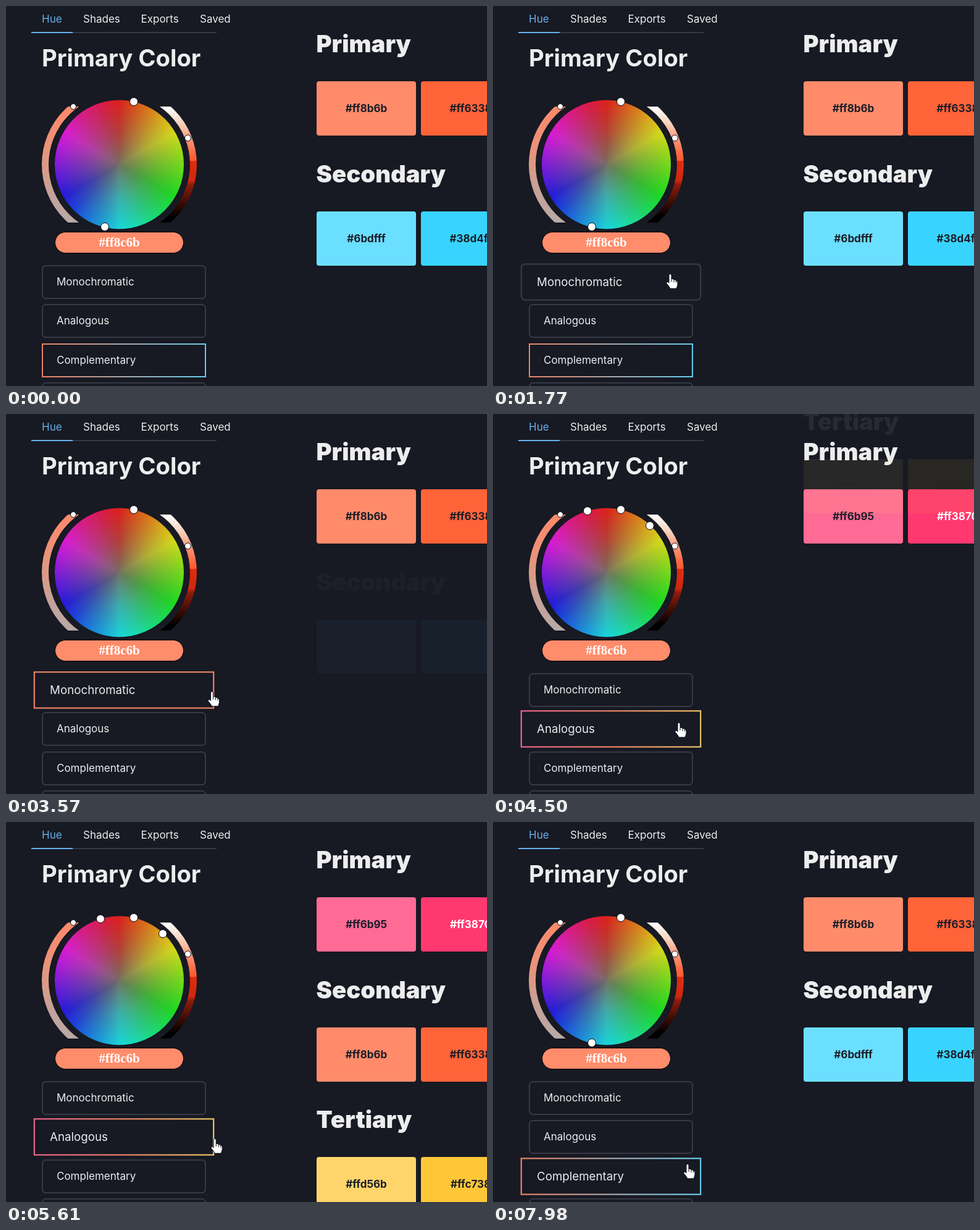
Animation of 779 by 616 pixels, one loop 8 s. Source, as an HTML page with a canvas:

```html
<!DOCTYPE html>
<html lang="en">
<head>
<meta charset="utf-8">
<title>Color palette picker</title>
<style>
  html, body { margin: 0; width: 100%; height: 100%; overflow: hidden; background: #171923; }
  canvas { display: block; }
</style>
</head>
<body>
<canvas id="stage" width="779" height="616"></canvas>
<script>
const ctx = document.getElementById('stage').getContext('2d');
const LOOP = 8000;
const BG = '#171923', LIGHT = '#ededee', DARK = '#1a1d28', LINE = '#373a44', BLUE = '#63b3ed';
const SANS = 'Inter, sans-serif';
const WHEEL = { x: 183.5, y: 257, r: 104.5 };

const CORAL = ['#ff8b6b', '#ff6338'];
const CYAN = ['#6bdfff', '#38d4ff'];
const PINK = ['#ff6b95', '#ff3870'];
const YELLOW = ['#ffd56b', '#ffc738'];
const MAIN_DOT = [207, 155];
const SCHEMES = {
  Monochromatic: { rows: [CORAL], dots: [MAIN_DOT] },
  Analogous: { rows: [PINK, CORAL, YELLOW], dots: [[153, 157], MAIN_DOT, [254, 181]] },
  Complementary: { rows: [CORAL, CYAN], dots: [MAIN_DOT, [160, 358]] }
};
const CLICK = { mono: 2050, analogous: 4470, complementary: 6890 };
const ENTER = 4483;

const BUTTONS = [
  { label: 'Monochromatic', y: 420, enter: 1330, leave: 3640 },
  { label: 'Analogous', y: 483, enter: 3760, leave: 5620 },
  { label: 'Complementary', y: 547, enter: 6326, leave: Infinity },
  { label: '', y: 610, enter: Infinity, leave: Infinity }
];

// time, x, y of the pointer tip
const POINTER = [
  [380, 529, 618], [620, 502, 548], [900, 446, 487], [1180, 364, 444],
  [1340, 320, 445], [1500, 297, 457], [1740, 287, 434], [3140, 287, 434],
  [3640, 339, 455], [3760, 322, 484], [3940, 293, 486], [4270, 293, 486],
  [4300, 291, 489], [4420, 291, 489], [4500, 301, 500], [4860, 299, 503],
  [5410, 299, 503], [5620, 340, 514], [5900, 391, 553], [6150, 364, 591],
  [6326, 324, 580], [6420, 319, 570], [7910, 319, 570], [7980, 315, 554], [8000, 315, 554]
];

const clamp = v => Math.min(1, Math.max(0, v));

function spring(ms) {
  if (!(ms > 0)) return 0;
  const s = ms / 1000, decay = 15, freq = 18;
  return 1 - Math.exp(-decay * s) * (Math.cos(freq * s) + decay / freq * Math.sin(freq * s));
}

function pointerAt(t) {
  const i = POINTER.findIndex((p, k) => k > 0 && t <= p[0]);
  if (t < POINTER[0][0] || i < 0) return null;
  const a = POINTER[i - 1], b = POINTER[i], span = b[0] - a[0], u = (t - a[0]) / span;
  const rests = (p, q) => !p || !q || (p[1] === q[1] && p[2] === q[2]);
  const slope = (k, axis) => {
    const prev = POINTER[k - 1], here = POINTER[k], next = POINTER[k + 1];
    if (rests(prev, here) || rests(here, next)) return 0;
    return (next[axis] - prev[axis]) / (next[0] - prev[0]);
  };
  const at = axis => {
    const w = u * u * (3 - 2 * u);
    return a[axis] + (b[axis] - a[axis]) * w +
      span * (slope(i - 1, axis) * u * (1 - u) ** 2 - slope(i, axis) * u * u * (1 - u));
  };
  return [at(1), at(2)];
}

function text(str, x, y, font, color, align = 'left') {
  ctx.font = font;
  ctx.fillStyle = color;
  ctx.textAlign = align;
  ctx.fillText(str, x, y);
}

function rounded(x, y, w, h, r) {
  ctx.beginPath();
  ctx.roundRect(x, y, w, h, r);
}

function linear(x0, y0, x1, y1, stops) {
  const g = ctx.createLinearGradient(x0, y0, x1, y1);
  stops.forEach(([at, color]) => g.addColorStop(at, color));
  return g;
}

function dot(x, y, r) {
  ctx.beginPath();
  ctx.arc(x, y, r, 0, Math.PI * 2);
  ctx.fillStyle = '#fff';
  ctx.fill();
  ctx.lineWidth = 1;
  ctx.strokeStyle = '#000';
  ctx.stroke();
}

function drawTabs() {
  ctx.fillStyle = LINE;
  ctx.fillRect(41, 42, 300, 2);
  ctx.fillStyle = BLUE;
  ctx.fillRect(41, 42, 67, 2);
  [['Hue', 58], ['Shades', 125], ['Exports', 218.5], ['Saved', 314]].forEach(([name, x], i) =>
    text(name, x, 27, `17px ${SANS}`, i ? LIGHT : BLUE));
}

function drawSliders() {
  const { x, y } = WHEEL, mid = 120, width = 11;
  const left = linear(0, 163, 0, 351, [[0, '#ff8a69'], [0.25, '#f08f74'], [0.5, '#dc9a84'], [0.75, '#c4a299'], [1, '#b8aaa6']]);
  const right = linear(0, 163, 0, 351, [
    [0, '#fff'], [0.13, '#f3d9c4'], [0.27, '#ff9c7f'], [0.4, '#ff6a40'], [0.47, '#ff5a2c'],
    [0.47, '#dd2c10'], [0.64, '#d2260d'], [0.67, '#8e1c0c'], [0.83, '#3c0c06'], [0.95, '#000'], [1, '#000']
  ]);
  ctx.save();
  ctx.beginPath();
  ctx.rect(50, 163, 270, 188);
  ctx.clip();
  ctx.lineWidth = width;
  [[left, Math.PI / 2], [right, -Math.PI / 2]].forEach(([paint, from]) => {
    ctx.beginPath();
    ctx.arc(x, y, mid, from, from + Math.PI);
    ctx.strokeStyle = paint;
    ctx.stroke();
  });
  ctx.restore();
  dot(109, 163, 4.5);
  dot(294.5, 214, 5);
}

function drawWheel() {
  const { x, y, r } = WHEEL;
  const hues = ctx.createConicGradient(-Math.PI / 2, x, y);
  for (let h = 0; h <= 360; h += 15) hues.addColorStop(h / 360, `hsl(${h + 2}, 79%, 48%)`);
  const grey = ctx.createRadialGradient(x, y, 0, x, y, r);
  grey.addColorStop(0, 'rgba(116,112,98,0.95)');
  grey.addColorStop(0.5, 'rgba(116,112,98,0.4)');
  grey.addColorStop(1, 'rgba(116,112,98,0)');
  ctx.beginPath();
  ctx.arc(x, y, r, 0, Math.PI * 2);
  for (const paint of [hues, grey]) {
    ctx.fillStyle = paint;
    ctx.fill();
  }
}

function drawPill() {
  rounded(79.5, 366.5, 208, 34, 17);
  ctx.fillStyle = '#ff8c6b';
  ctx.fill();
  ctx.lineWidth = 1;
  ctx.strokeStyle = '#000';
  ctx.stroke();
  text('#ff8c6b', 183.5, 390, 'bold 21px "Liberation Serif", serif', '#fff', 'center');
}

function drawButton(button, t, active) {
  const { label, y, enter, leave } = button;
  const scale = 1 + 0.1 * (spring(t - enter) - spring(t - leave));
  const cx = 191, cy = y + 27.5;
  ctx.save();
  ctx.translate(cx, cy);
  ctx.scale(scale, scale);
  ctx.translate(-cx, -cy);
  ctx.lineWidth = 2;
  if (active) {
    const rows = SCHEMES[label].rows, last = Math.max(1, rows.length - 1);
    ctx.globalAlpha = 0.92;
    ctx.strokeStyle = linear(58, 0, 324, 0, rows.map((row, i) => [i / last, row[0]]));
    ctx.strokeRect(59, y + 1, 264, 53);
    ctx.globalAlpha = 1;
  } else {
    ctx.strokeStyle = LINE;
    rounded(59, y + 1, 264, 53, 5.5);
    ctx.stroke();
  }
  text(label, 82, y + 33, `17px ${SANS}`, LIGHT);
  ctx.restore();
}

function drawRow(index, colors, alpha, offset) {
  if (alpha <= 0) return;
  const title = ['Primary', 'Secondary', 'Tertiary'][index];
  const top = Math.round(122 + index * 210.6 + offset);
  ctx.globalAlpha = alpha;
  text(title, 502.5, top - 47, `900 38.25px ${SANS}`, LIGHT);
  colors.forEach((color, i) => {
    const x = 503 + i * 169;
    rounded(x, top, 161, 88, 4);
    ctx.fillStyle = color;
    ctx.fill();
    text(color, x + 80.5, top + 50, `bold 17px ${SANS}`, color === PINK[1] ? '#fff' : DARK, 'center');
  });
  ctx.globalAlpha = 1;
}

function drawPalette(t, scheme) {
  const fade = since => (1 - clamp((t - since) / 500)) ** 4;
  const age = Math.max(0, t - ENTER), damp = 0.022 * age;
  const entering = t >= CLICK.analogous && t < CLICK.complementary;
  const alpha = entering ? 1 - (1 - clamp(age / 500)) ** 2.2 : 1;
  const offset = entering ? -500 * (1 + damp) * Math.exp(-damp) : 0;

  scheme.rows.forEach((colors, i) => drawRow(i, colors, i ? alpha : 1, i ? offset : 0));
  if (t >= CLICK.mono && t < CLICK.analogous) drawRow(1, CYAN, Math.max(0.035, fade(CLICK.mono)), 0);
  if (t >= CLICK.complementary) drawRow(2, YELLOW, fade(CLICK.complementary), 0);
}

const HAND = new Path2D('M-2 2Q0-1.5 2 2V8.5Q5 7.5 6 10Q9 9 9.5 11.5Q12 11 12 13.5V18Q11.5 21 10 24H0Q-2 20-6 15.5Q-6.5 12.5-4 13L-2 15Z');
const FINGERS = new Path2D('M2 9V13M6 10.5V14M9.5 12V14.5');
const ARROW = new Path2D('M0 0V16L4 12.5L6.5 18.5L9 17.3L6.5 11.5H12Z');

function drawPointer(t) {
  const tip = pointerAt(t);
  if (!tip) return;
  const hand = BUTTONS.some(b => t >= b.enter && t < b.leave);
  const shape = hand ? HAND : ARROW;
  ctx.save();
  ctx.translate(...tip);
  ctx.lineWidth = 1;
  ctx.strokeStyle = '#0b0c12';
  ctx.fillStyle = '#fff';
  ctx.fill(shape);
  ctx.stroke(shape);
  if (hand) ctx.stroke(FINGERS);
  ctx.restore();
}

function schemeAt(t) {
  if (t < CLICK.mono || t >= CLICK.complementary) return 'Complementary';
  return t < CLICK.analogous ? 'Monochromatic' : 'Analogous';
}

function draw(t) {
  const name = schemeAt(t), scheme = SCHEMES[name];
  ctx.fillStyle = BG;
  ctx.fillRect(0, 0, 779, 616);
  drawTabs();
  text('Primary Color', 58, 98, `bold 38.25px ${SANS}`, LIGHT);
  drawSliders();
  drawWheel();
  drawPill();
  scheme.dots.forEach(([x, y]) => dot(x, y, 6.5));
  BUTTONS.forEach(b => drawButton(b, t, b.label === name));
  drawPalette(t, scheme);
  drawPointer(t);
}

const start = performance.now();
function tick() {
  draw((performance.now() - start) % LOOP);
  requestAnimationFrame(tick);
}
tick();
</script>
</body>
</html>
```
